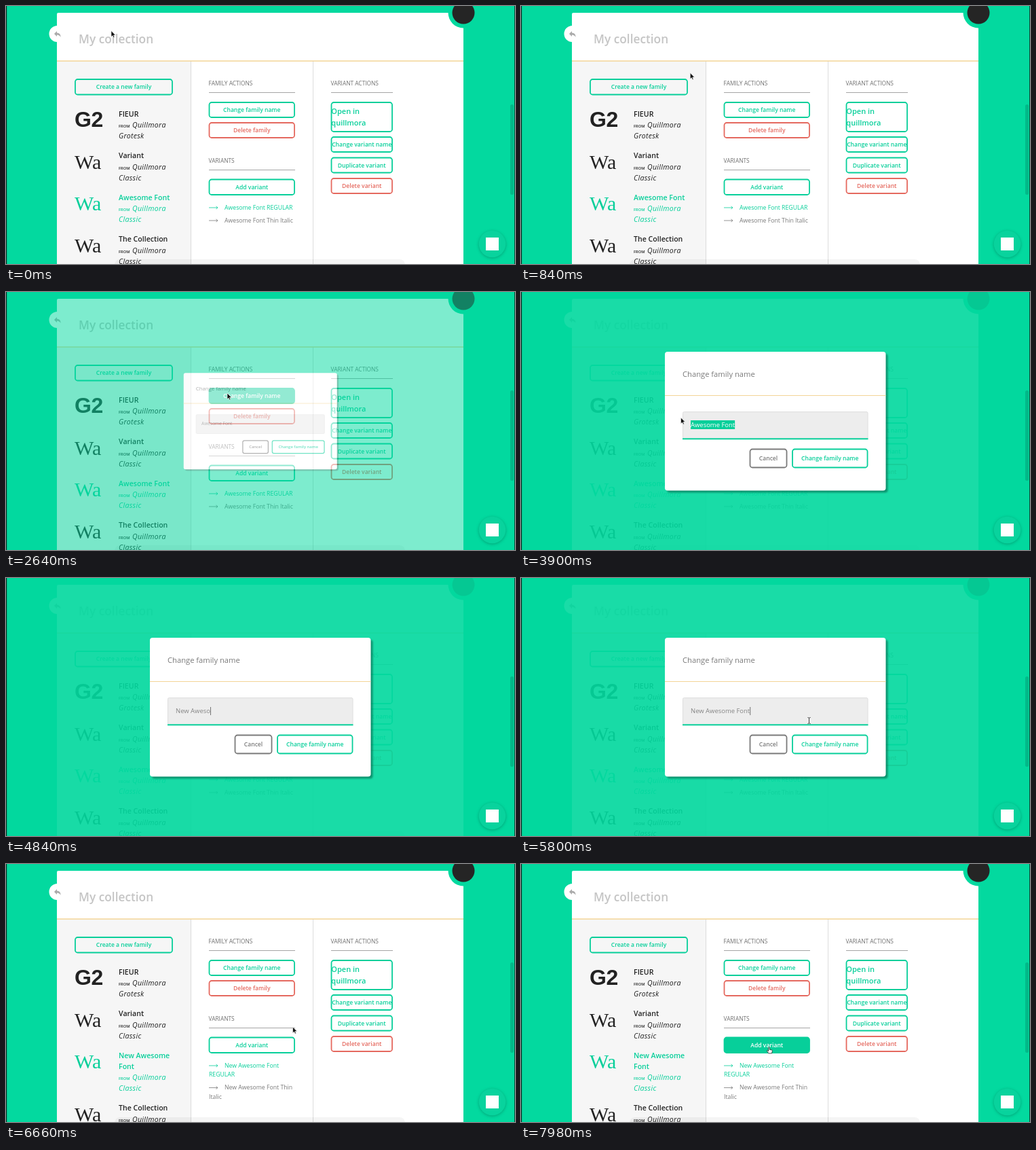
An HTML page for the animation above (8 s loop, 750x380 px).

```html
<!DOCTYPE html>
<html lang="en">
<head>
<meta charset="utf-8">
<title>Rename a font family</title>
<style>
  html, body { margin: 0; width: 100%; height: 100%; overflow: hidden; background: #03d99f; }
  svg { display: block; width: 750px; height: 380px; }
  text { font-family: "Open Sans", "Noto Sans", sans-serif; white-space: pre; }
  .semi { font-weight: 600; }
  .btn text { font-size: 8.55px; font-weight: 600; text-anchor: middle; }
  .btn .big { font-size: 11px; text-anchor: start; }
  .title { font-size: 10.6px; font-weight: 600; }
  .base { font-size: 10.6px; font-style: italic; letter-spacing: .3px; }
  .from { font-size: 5.7px; font-weight: 600; }
  .head { font-size: 8.35px; fill: #707070; }
  .item { font-size: 8.7px; }
  .serif { font: 30px "Liberation Serif", serif; }
  .sans { font: bold 32px "Liberation Sans", sans-serif; letter-spacing: -.5px; }
  .field { font-size: 9.46px; }
</style>
</head>
<body>
<svg id="stage" viewBox="0 0 750 380"></svg>
<script>
const GREEN = '#03d99f', TEXT_GREEN = '#07cf9a', RED = '#e5695f', INK = '#222', GREY = '#7a7a7a', SAND = '#f3d597';
const LOOP = 8000;
const OPEN = 2500, CLOSE = 6200, FADE = 260;
const OLD_NAME = 'Awesome Font', NEW_NAME = 'New Awesome Font';
const TYPE_START = 4250, TYPE_STEP = 70;
const DRAG_START = 3350, DRAG_END = 3800;

const rect = (x, y, w, h, fill, extra = '') =>
  `<rect x="${x}" y="${y}" width="${w}" height="${h}" fill="${fill}" ${extra}/>`;
const text = (x, y, str, cls, fill = '') =>
  `<text x="${x}" y="${y}" class="${cls}" ${fill && `fill="${fill}"`}>${str}</text>`;
const line = (x1, y1, x2, y2, color, width = 1) =>
  `<path d="M${x1} ${y1}L${x2} ${y2}" stroke="${color}" stroke-width="${width}"/>`;

function button(x, y, w, h, label, color = TEXT_GREEN, id = '', lines = null) {
  const body = lines
    ? lines.map((s, i) => text(x + .8, y + 18 + i * 17, s, 'big')).join('')
    : text(x + w / 2, y + h / 2 + 3.1, label, '');
  return `<g class="btn" ${id && `id="${id}"`} fill="${color}">` +
    rect(x + 1, y + 1, w - 2, h - 2, 'none', `rx="3.5" stroke="${color}" stroke-width="1.8"`) + body + '</g>';
}

function family(y, names, style, sample, cls, color = INK) {
  const end = y + (names.length - 1) * 16;
  return `<g fill="${color}">` +
    text(101, y + 15.5, sample, cls) +
    names.map((s, i) => text(166, y + i * 16, s, 'title')).join('') +
    text(166, end + 16.5, 'FROM', 'from') +
    text(186, end + 16.5, 'Quillmora', 'base') +
    text(166, end + 32.5, style, 'base') + '</g>';
}

function variant(y, lines, color) {
  return `<g fill="${color}"><path d="M299 ${y - 2.5}h13m-2.5 -2l2.5 2l-2.5 2" fill="none" stroke="${color}" stroke-width=".8"/>` +
    lines.map((s, i) => text(i ? 299 : 322, y + i * 13.5, s, 'item')).join('') + '</g>';
}

const lists = (id, names, regular, thin, thinY, lastY) => `<g id="${id}">` +
  family(285.5, names, 'Classic', 'Wa', 'serif', TEXT_GREEN) +
  family(lastY, ['The Collection'], 'Classic', 'Wa', 'serif') +
  variant(299.5, regular, TEXT_GREEN) + variant(thinY, thin, GREY) + '</g>';

const page =
  rect(75, 10, 599, 380, '#fff', 'rx="2"') +
  rect(75, 81, 197, 299, '#f6f6f6') +
  line(272.5, 81, 272.5, 380, '#dcdcdc') + line(452.5, 81, 452.5, 380, '#dcdcdc') +
  line(75, 81, 674, 81, SAND, 1.5) +
  '<circle cx="75.5" cy="41" r="12" fill="#fff"/>' +
  '<path d="M75 37l-4 4l4 4v-2.6q4 0 5.500 3.600q.3 -6 -5.500 -6.400z" fill="#aaa"/>' +
  `<circle cx="674" cy="10" r="22.500" fill="${GREEN}"/><circle cx="674" cy="10" r="16.500" fill="#252525"/>` +
  text(107, 55, 'My collection', 'semi" font-size="17.3', '#c5c5c5') +
  button(101, 107, 145, 24.5, 'Create a new family') +
  family(162.5, ['FIEUR'], 'Grotesk', 'G2', 'sans') +
  family(224, ['Variant'], 'Classic', 'Wa', 'serif') +
  text(298.5, 117, 'FAMILY ACTIONS', 'head') + line(299, 127.5, 426, 127.5, '#a5a5a5') +
  button(298.5, 141, 127.5, 24, 'Change family name', TEXT_GREEN, 'rename') +
  button(298.5, 171, 127.5, 24, 'Delete family', RED) +
  text(298.5, 230.5, 'VARIANTS', 'head') + line(299, 241.5, 426, 241.5, '#a5a5a5') +
  button(298.5, 254.5, 127.5, 24.5, 'Add variant', TEXT_GREEN, 'add') +
  text(478.5, 117, 'VARIANT ACTIONS', 'head') + line(479, 127.5, 570, 127.5, '#a5a5a5') +
  button(478.5, 141, 91.5, 45, '', TEXT_GREEN, '', ['Open in', 'quillmora']) +
  button(478.5, 192, 91.5, 24, 'Change variant name') +
  button(478.5, 222.500, 91.5, 24, 'Duplicate variant') +
  button(478.5, 253, 91.5, 24, 'Delete variant', RED) +
  lists('before', [OLD_NAME], ['Awesome Font REGULAR'], ['Awesome Font Thin Italic'], 318.5, 347) +
  lists('after', ['New Awesome', 'Font'], ['New Awesome Font', 'REGULAR'], ['New Awesome Font Thin', 'Italic'], 332, 363) +
  rect(160, 373, 428, 20, '#000', 'rx="8" opacity=".04"');

const modal =
  `<g id="overlay">${rect(0, 0, 750, 380, GREEN, 'opacity=".91"')}<g id="modal">` +
  rect(212, 88, 325.5, 204.5, '#fff', 'rx="4" style="filter:drop-shadow(3px 3px 1px rgba(0,90,65,.55))"') +
  text(238, 124.5, 'Change family name', '" font-size="11.2', GREY) +
  line(212, 152.5, 537.5, 152.5, SAND, 1.2) +
  rect(238.5, 176.5, 272.500, 40, '#ededed', 'rx="2" stroke="#dedede"') +
  `<g id="focus">${rect(238, 215.3, 273.5, 2, TEXT_GREEN)}</g>` +
  '<text id="value" x="250" y="199" class="field" fill="#858585"></text>' +
  '<g id="selection">' + rect(0, 189, 0, 13, TEXT_GREEN, 'id="mark"') +
  `<g clip-path="url(#marked)">${text(250, 199, OLD_NAME, 'field', '#fff')}</g></g>` +
  rect(0, 190, .8, 12, '#555', 'id="caret"') +
  button(336.5, 230.5, 56, 29, 'Cancel', GREY) +
  button(399, 230.5, 112.5, 29, 'Change family name', TEXT_GREEN, 'confirm') +
  '</g></g>';

const chrome =
  rect(743, 145, 5, 133, '#02b989', 'rx="2.500"') +
  rect(0, 0, 1.2, 380, '#0c2b22') + rect(749, 0, 1, 380, '#0c4a38') +
  '<circle cx="716.5" cy="350.5" r="19.8" fill="#08d39d" style="filter:drop-shadow(0 1px 2px rgba(0,70,50,.35))"/>' +
  rect(707, 341, 19, 19, '#fff');

const cursors =
  '<g id="arrow"><path d="M0 0v9l2.1 -1.900l1.300 3l1.500 -.7l-1.300 -2.900h2.800z" fill="#111" stroke="#fff" stroke-width=".6"/></g>' +
  '<g id="hand"><path d="M-.8 .6q.8 -1.200 1.600 0v3.200l3.400 .8q.8 .3 .6 1.400l-.8 3.400h-4.600l-2.600 -3.600q.2 -1.200 1.300 -.5l1.100 .9z" fill="#fff" stroke="#222" stroke-width=".8"/></g>' +
  '<g id="beam"><path d="M-2 -4.500q2 0 2 1.200v6.600q0 1.200 -2 1.200m4 -9q-2 0 -2 1.200m0 6.600q0 1.200 2 1.200" fill="none" stroke="#333" stroke-width=".9"/></g>';

const stage = document.getElementById('stage');
stage.innerHTML = `<defs><clipPath id="marked">${rect(0, 189, 0, 13, '#000', 'id="markClip"')}</clipPath></defs>` +
  rect(0, 0, 750, 380, GREEN) + page + modal + chrome + cursors;

const el = id => document.getElementById(id);
const show = (id, on) => { el(id).style.visibility = on ? 'visible' : 'hidden'; };
const set = (id, attrs) => { for (const k in attrs) el(id).setAttribute(k, attrs[k]); };
const clamp = v => Math.max(0, Math.min(1, v));
const smooth = v => { v = clamp(v); return v * v * (3 - 2 * v); };

// Pointer stops: time, x, y
const path = [
  [0, 155, 36.5], [200, 155, 36.5], [1400, 326, 149], [2700, 326, 149],
  [3250, 320, 196], [DRAG_START, 320, 196], [DRAG_END, 235.5, 185], [5400, 235.5, 185],
  [5780, 424.5, 210], [5850, 424.5, 210], [6050, 422.5, 240], [6850, 422.5, 240],
  [7700, 365.5, 269.5], [LOOP, 365.5, 269.5]
];

function pointer(t) {
  let i = 0;
  while (i < path.length - 2 && t >= path[i + 1][0]) i++;
  const [t0, x0, y0] = path[i], [t1, x1, y1] = path[i + 1];
  const k = smooth((t - t0) / (t1 - t0));
  return [x0 + (x1 - x0) * k, y0 + (y1 - y0) * k];
}

const inside = ([x, y], x0, y0, x1, y1) => x > x0 && x < x1 && y > y0 && y < y1;

function fillButton(id, on) {
  const [box, label] = el(id).children;
  box.setAttribute('fill', on ? TEXT_GREEN : 'none');
  label.setAttribute('fill', on ? '#fff' : TEXT_GREEN);
}

function drawField(t, visible) {
  const typed = Math.max(0, Math.min(NEW_NAME.length, Math.floor((t - TYPE_START) / TYPE_STEP) + 1));
  const value = el('value');
  value.textContent = typed ? NEW_NAME.slice(0, typed) : OLD_NAME;
  const end = 250 + value.getComputedTextLength();

  let left = end;
  const selecting = visible && t >= DRAG_START && !typed;
  if (selecting) {
    const x = pointer(Math.min(t, DRAG_END))[0];
    for (let i = OLD_NAME.length - 1; i >= 0; i--) {
      const edge = 250 + (i ? value.getSubStringLength(0, i) : 0);
      if (x < edge + 2.5) left = edge;
    }
  }
  const span = { x: left, width: end - left };
  set('mark', span);
  set('markClip', span);
  show('selection', selecting);

  const typing = typed > 0 && typed < NEW_NAME.length;
  const blink = typing || (t - 5300) % 1000 < 600;
  set('caret', { x: end + .2 });
  show('caret', visible && typed > 0 && blink);
  show('focus', visible && t > 3260);
}

function update(t) {
  const opacity = smooth((t - OPEN) / FADE) * (1 - smooth((t - CLOSE) / FADE));
  const scale = .3 + .7 * opacity;
  const open = opacity > 0;
  set('overlay', { opacity });
  show('overlay', open);
  set('modal', { transform: `translate(374.7 190.3) scale(${scale}) translate(-374.7 -190.3)` });
  drawField(t, open);

  show('before', t < CLOSE);
  show('after', t >= CLOSE);

  const at = pointer(t);
  const onRename = t < OPEN + FADE && inside(at, 298, 141, 426, 165);
  const onAdd = t > CLOSE + FADE && inside(at, 298, 254, 426, 279);
  const onConfirm = open && t > 5800 && inside(at, 399, 230, 512, 260);
  fillButton('rename', onRename);
  fillButton('add', onAdd);
  fillButton('confirm', onConfirm);

  const hidden = t >= TYPE_START && t < 5400;
  const kind = (onRename && !open) || onAdd || (onConfirm && t < CLOSE) ? 'hand'
    : open && t < CLOSE && inside(at, 238, 176, 511, 217) && t > OPEN + FADE ? 'beam' : 'arrow';
  for (const id of ['arrow', 'hand', 'beam']) {
    show(id, id === kind && !hidden);
    set(id, { transform: `translate(${at[0]} ${at[1]})` });
  }
}

const start = performance.now();
function tick() {
  update((performance.now() - start) % LOOP);
  requestAnimationFrame(tick);
}
tick();
</script>
</body>
</html>
```
